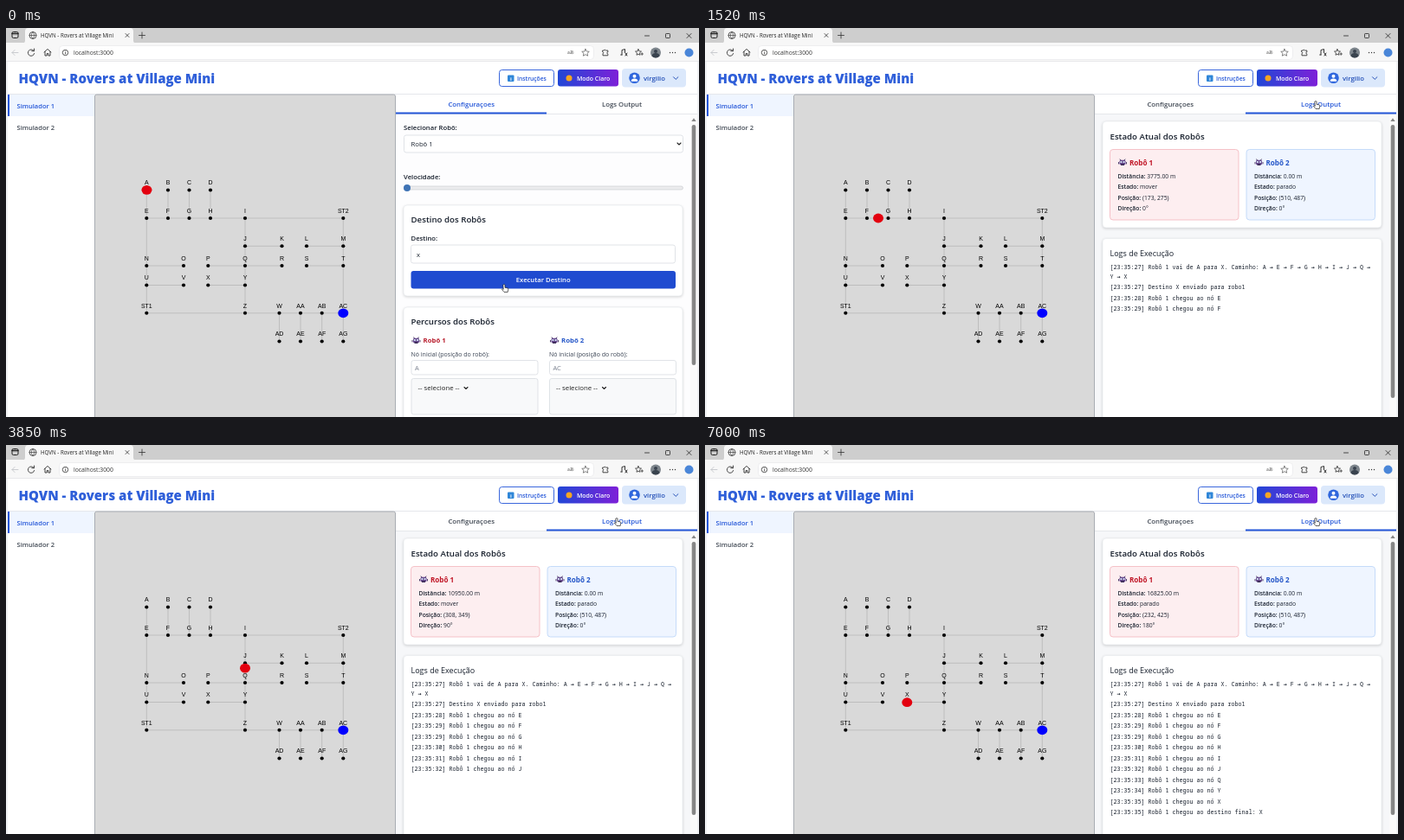
Recreate the animation shown at these times as an HTML page. Size 800 by 450 pixels, loop 7030 ms.

```html
<!DOCTYPE html>
<html lang="pt">
<head>
<meta charset="utf-8">
<title>Simulador</title>
<style>
html, body { margin: 0; width: 100%; height: 100%; overflow: hidden; background: #fff; }
svg { display: block; width: 100vw; height: 100vh; font-family: "Open Sans", "Noto Sans", sans-serif; }
text { white-space: pre; }
.map { font-family: "Liberation Sans", Arial, sans-serif; }
.mono { font-family: "Noto Sans Mono", "DejaVu Sans Mono", monospace; }
.arrow { font-family: "DejaVu Sans Mono", monospace; font-weight: 700; }
.card { filter: drop-shadow(0 1px 1.5px rgba(0,0,0,.16)); }
</style>
</head>
<body>
<svg id="stage" viewBox="0 0 800 450"></svg>
<script>
const LOOP = 7030;
const BLUE = '#2456d8', INK = '#18202d', GREY = '#414954';

// Drawing helpers; text is placed by the middle of its capitals.
const text = (x, cy, s, size, weight = 400, fill = INK, extra = '') =>
  `<text x="${x}" y="${(cy + size * .38).toFixed(2)}" font-size="${size}" font-weight="${weight}" fill="${fill}" ${extra}>${s}</text>`;
const rect = (x, y, w, h, fill, r = 0, stroke = 'none', extra = '') =>
  `<rect x="${x}" y="${y}" width="${w}" height="${h}" rx="${r}" fill="${fill}" stroke="${stroke}" ${extra}/>`;
const dot = (x, y, r, fill, stroke = 'none') =>
  `<circle cx="${x}" cy="${y}" r="${r}" fill="${fill}" stroke="${stroke}" stroke-width=".9"/>`;
const line = (d, stroke = '#333', w = .9, fill = 'none') =>
  `<path d="${d}" stroke="${stroke}" stroke-width="${w}" fill="${fill}" stroke-linecap="round" stroke-linejoin="round"/>`;
const mid = 'text-anchor="middle"';
const card = (y, h) => rect(459, y, 322, h, '#fff', 4, '#e5e7eb', 'stroke-width=".6" class="card"');

function browser() {
  return rect(0, 0, 800, 18, '#cecece') + rect(0, 17, 800, 22, '#f7f7f7') +
    `<path d="M19 17.5q3 0 3-3V4q0-4 4-4H143q4 0 4 4v10.5q0 3 3 3z" fill="#f7f7f7"/>` +
    rect(7, 4.5, 7, 7, 'none', 1.5, '#222', 'stroke-width="1"') + line('M7 6.5H14', '#222', 1.3) +
    dot(31, 8.5, 4, 'none', '#444') + line('M27 8.5H35M31 4.5Q27.5 8.5 31 12.5Q34.5 8.5 31 4.5', '#444', .7) +
    text(40, 8.5, 'HQVN - Rovers at Village Mini', 6.2, 400, '#222') +
    line('M138 6.5l4 4m0-4l-4 4M157 5v7M153.5 8.5h7', '#333', .8) +
    line('M737.5 9h5M786 6.5l5 5m0-5l-5 5', '#222', .8) + rect(761.5, 6.5, 5, 5, 'none', .8, '#222', 'stroke-width=".8"') +
    line('M14 28.5H7m3-3l-3 3l3 3', '#c5c7cb', .9) +
    line('M32 26.3A3.7 3.7 0 1 0 32.7 29.5M32.5 24v2.7h-2.7', '#333', .9) +
    line('M44 28l4-3.6l4 3.6M45 27.5V32h2.2v-2.5h1.7V32H51v-4.5', '#333', .9) +
    rect(61.5, 20.5, 617, 16, '#fff', 4, '#e4e5e8', 'stroke-width=".6"') +
    dot(68.5, 28.5, 3.2, 'none', '#444') + line('M68.5 28.3v1.7M68.5 26.8v.1', '#444', .8) +
    text(78, 28.3, 'localhost:3000', 6.8, 400, '#333') +
    text(648, 28.5, 'aあ', 5, 400, '#444') +
    line('M669 24.3l1.25 2.7l3 .3l-2.2 2l.6 2.9l-2.65-1.5l-2.65 1.5l.6-2.9l-2.2-2l3-.3z', '#555', .7) +
    line('M689 26h1.5q.5-2 2 0h2.3v2q-2.5.4 0 2.2v1.6H689v-2q2-1.2 0-2z', '#333', .9) +
    line('M711 31v-5.5l3.5-1v4M709.7 31h1.3M715 29l2 3m0-3l-2 3', '#333', 1) +
    line('M730 24.5l1 2.3l2.5.3l-2 1.7l.5 2.5l-2-1.2l-2 1.2l.4-2.5l-1.9-1.7l2.5-.3zM733 30h2.5M734.2 28.8v2.5', '#333', .8) +
    dot(750, 28.5, 6, '#7d858c') + `<path d="M745.5 32.5a4.5 3.5 0 0 1 9 0a6 6 0 0 1-9 0z" fill="#39434e"/>` + dot(750, 27, 2, '#39434e') +
    [766.5, 769.5, 772.5].map(x => dot(x, 28.5, .7, '#333')).join('') +
    dot(788.5, 28.5, 5, '#4a86d8') +
    rect(0, 38.5, 2, 412, '#f1f2f4') + rect(798, 38.5, 2, 412, '#f1f2f4') + rect(0, 38.3, 800, .7, '#e2e3e6');
}

function header() {
  return text(14.5, 58.5, 'HQVN - Rovers at Village Mini', 15, 800, '#2f5fd9') +
    rect(569.5, 48.5, 63, 19, '#fff', 3, BLUE, 'stroke-width=".9"') +
    rect(579, 54.5, 7.5, 7.5, '#2f86d8', 1) + text(582.8, 58.3, 'i', 6, 700, '#fff', mid) +
    text(590, 58, 'Instruções', 6.7, 600, BLUE) +
    rect(637, 48, 70, 19.5, 'url(#mode)', 3) + dot(650, 58, 3.5, '#f5a623') +
    text(659, 58, 'Modo Claro', 6.9, 600, '#fff') +
    rect(711, 47, 74, 21.5, '#dbe8fb', 4) + dot(725.5, 57.7, 6.3, '#2f66dd') +
    dot(725.5, 55.7, 2, '#fff') + `<path d="M721.7 61.7a3.8 3.2 0 0 1 7.6 0z" fill="#fff"/>` +
    text(736, 57.7, 'virgilio', 7.7, 600, '#2450b8') + line('M770.5 56.7l2.7 2.7l2.7-2.7', '#2450b8', 1) +
    rect(2, 76, 796, .8, '#dfe2e6') +
    rect(2, 77, 100, 25, '#eff5ff') + rect(2, 77, 2, 25, BLUE) +
    text(12.5, 89.7, 'Simulador 1', 7.55, 600, BLUE) + text(12.5, 114.7, 'Simulador 2', 7.55, 600, GREY);
}

// Map: names per row with their x.
const rows = [
  [187.5, 'A 162.3 B 187 C 211.5 D 236'],
  [220, 'E 162.3 F 187 G 211.5 H 236 I 276 ST2 389.3'],
  [252.3, 'J 276 K 318.5 L 347 M 389.3'],
  [275, 'N 162.3 O 205 P 233.3 Q 276 R 318.5 S 347 T 389.3'],
  [297.5, 'U 162.3 V 205 X 233.3 Y 276'],
  [329.8, 'ST1 162.3 Z 276 W 315.5 AA 340 AB 364.7 AC 389.3'],
  [362.5, 'AD 315.5 AE 340 AF 364.7 AG 389.3']
];
const edges = 'A-E B-F C-G D-H E-ST2 E-ST1 I-Z ST2-AG J-K L-M N-O P-R S-T U-V X-Y ST1-AC W-AD AA-AE AB-AF';

function map() {
  const at = {};
  for (const [y, list] of rows) {
    const w = list.split(' ');
    for (let i = 0; i < w.length; i += 2) at[w[i]] = [+w[i + 1], y];
  }
  let out = rect(102.5, 77, 347, 380, '#d9d9d9', 2, '#a9adb3', 'stroke-width="1"');
  for (const e of edges.split(' ')) {
    const [a, b] = e.split('-');
    out += line(`M${at[a]}L${at[b]}`, '#b2b2b2', .7);
  }
  for (const n in at) {
    const [x, y] = at[n];
    out += `<ellipse cx="${x}" cy="${y}" rx="2.1" ry="2" fill="#000"/>` + text(x, y - 8.7, n, 7, 400, '#000', mid + ' class="map"');
  }
  return out + '<ellipse cx="389.3" cy="329.8" rx="6" ry="5.4" fill="#00f"/>' +
    '<ellipse id="bot" rx="6" ry="5.4" fill="#e3000f"/>';
}

const face = (x, y) => rect(x - 3.5, y - 2.8, 7, 5.6, '#6b4c93', 1.5) +
  line(`M${x - 3} ${y - 3.5}l1.2 1M${x + 3} ${y - 3.5}l-1.2 1M${x - 4.5} ${y}v1.5M${x + 4.5} ${y}v1.5`, '#4a3a66', 1) +
  dot(x - 1.6, y - .5, 1.1, '#d9eef8') + dot(x + 1.6, y - .5, 1.1, '#d9eef8') + rect(x - 2, y + 1.5, 4, 2, '#41305c', .5);

function config() {
  const field = (x, y, w, h, fill = '#fff') => rect(x, y, w, h, fill, 2.5, '#d9dce1', 'stroke-width=".8"');
  const route = (x, n, start, color) =>
    face(x + 6, 361.5) + text(x + 14, 361.3, 'Robô ' + n, 7.8, 700, color) +
    text(x, 377, 'Nó inicial (posição do robô):', 7, 400, '#374151') +
    field(x + .5, 384.5, 146, 16.5) + text(x + 4.5, 393, start, 7.5, 400, '#7b8290') +
    field(x + .5, 405.5, 146, 41.5, '#f8f9fa') + text(x + 8, 416.5, '-- selecione --', 7.8, 400, '#222') +
    line(`M${x + 61.5} 415.5l2 2l2-2`, '#222', 1.1);
  return rect(450, 100, 340, 350, '#fdfdfe') +
    text(459, 115, 'Selecionar Robô:', 7.7, 600) +
    field(459.5, 124, 322, 20) + text(467.5, 134.2, 'Robô 1', 7.7) + line('M775 133l2 2l2-2', '#222', 1.1) +
    text(459, 171.7, 'Velocidade:', 7.7, 600) +
    rect(459.5, 183, 322, 4, '#ececee', 2, '#c3c6ca', 'stroke-width=".6"') + dot(463, 185, 4, '#3f74b5') +
    card(205, 105) + text(467.5, 221.5, 'Destino dos Robôs', 9.7, 600) +
    text(467.5, 243, 'Destino:', 7.7, 600) + field(467.5, 251, 305, 21) + text(474, 262, 'x', 7.7) +
    rect(467.5, 281, 305.5, 20.5, '#1f4bd0', 3, 'none', 'id="go"') + text(620.2, 291.5, 'Executar Destino', 7.7, 600, '#fff', mid) +
    card(323, 140) + text(467.5, 339.5, 'Percursos dos Robôs', 9.7, 600) +
    route(467.5, 1, 'A', '#b81c2c') + route(627, 2, 'AC', '#2456c8');
}

function logs() {
  const state = (x, n, fill, edge, color, vals) =>
    rect(x, 140.5, 148.5, 81.5, fill, 3.5, edge, 'stroke-width=".8"') +
    face(x + 14.5, 155.5) + text(x + 22.5, 155.5, 'Robô ' + n, 8.1, 700, color) +
    ['Distância', 'Estado', 'Posição', 'Direção'].map((k, i) =>
      text(x + 9, 171.2 + i * 12.5, `<tspan font-weight="600">${k}:</tspan> <tspan id="v${n}${i}">${vals[i]}</tspan>`, 6.75)).join('');
  const entry = ([, s], i) =>
    text(467.5, 276.3 + (i && i * 12.5 - 1.5), s.replace(/→/g, '<tspan class="arrow">→</tspan>'), 6.68, 400, INK, `class="mono" id="log${i}"`);
  return rect(450, 100, 340, 350, '#f6f7f9') +
    card(108, 123) + text(467.5, 125.5, 'Estado Atual dos Robôs', 9.7, 600) +
    state(467.5, 1, '#fdeef0', '#f3b4bb', '#c01627', ['', '', '', '']) +
    state(625, 2, '#eff5ff', '#b9d3f8', '#2456c8', ['0.00 m', 'parado', '(510, 487)', '0°']) +
    card(243.5, 220) + text(467.5, 260.2, 'Logs de Execução', 9, 500) +
    entries.map(entry).join('');
}

// Log: time of appearance and line.
const entries = [
  [60, '[23:35:27] Robô 1 vai de A para X. Caminho: A → E → F → G → H → I → J → Q →'],
  [60, 'Y → X'],
  [60, '[23:35:27] Destino X enviado para robo1'],
  ...[[770, 28, 'E'], [1265, 29, 'F'], [1745, 29, 'G'], [2250, 30, 'H'], [3025, 31, 'I'],
    [3715, 32, 'J'], [4210, 33, 'Q'], [4710, 34, 'Y'], [5490, 35, 'X']]
    .map(([t, s, n]) => [t, `[23:35:${s}] Robô 1 chegou ao nó ${n}`]),
  [5550, '[23:35:35] Robô 1 chegou ao destino final: X']
];

// Time, then simulator x and y.
const route = [[60, 106, 212], [770, 106, 275], [910, 117, 275], [2060, 222, 275], [3025, 308, 275],
  [4640, 308, 419], [4705, 308, 425], [5120, 267, 425], [5490, 232, 425]];
const metres = [[60, 0], [910, 2175], [2060, 5175], [3030, 9100], [4640, 12725], [5550, 16825]];
const mouse = [[180, 0, 0], [320, 24, -35], [560, 105, -175], [740, 130, -212]];

function along(keys, t) {
  if (t <= keys[0][0]) return keys[0].slice(1);
  for (let i = 1; i < keys.length; i++) {
    const a = keys[i - 1], b = keys[i];
    if (t < b[0]) {
      const k = (t - a[0]) / (b[0] - a[0]);
      return a.slice(1).map((v, j) => v + (b[j + 1] - v) * k);
    }
  }
  return keys[keys.length - 1].slice(1);
}

const $ = id => document.getElementById(id);
$('stage').innerHTML =
  '<defs><linearGradient id="mode"><stop offset="0" stop-color="#2147d6"/><stop offset="1" stop-color="#7d20d8"/></linearGradient></defs>' +
  rect(0, 0, 800, 450, '#fff') + browser() + header() + map() +
  `<g id="config">${config()}</g><g id="logs">${logs()}</g>` +
  rect(450, 77, 348, 23, '#fff') + rect(450, 99, 348, .8, '#dfe2e6') + rect(450, 97.5, 174, 2, BLUE, 0, 'none', 'id="under"') +
  text(537.2, 87.8, 'Configuraçoes', 7.8, 600, BLUE, mid + ' id="tab0"') +
  text(711, 87.8, 'Logs Output', 7.8, 600, GREY, mid + ' id="tab1"') +
  rect(790, 100, 8, 350, '#fafafa') + '<path d="M791.3 108l2.7-3.7l2.7 3.7z" fill="#868686"/>' +
  rect(791.7, 112, 4.6, 278, '#868686', 2.3, 'none', 'id="thumb"') +
  '<g id="mouse">' +
  `<g id="hand">${line('M574 297q1.2-1 2 0v3.3l3 .6q1 .2.8 1.3l-.6 3.3h-4.2l-2.5-3q-.2-1.3 1.5-.4z', '#222', .7, '#fff')}</g>` +
  `<g id="arrow">${line('M574 296v8.5l2-1.8l1.3 3l1.4-.6l-1.3-2.9h2.6z', '#222', .7, '#fff')}</g></g>`;

const show = (id, on) => $(id).setAttribute('visibility', on ? 'inherit' : 'hidden');

function draw(t) {
  const [x, y] = along(route, t);
  $('bot').setAttribute('cx', 276 + (x - 308) * .562);
  $('bot').setAttribute('cy', 220 + (y - 275) * .518);

  const [m] = along(metres, t);
  $('v10').textContent = (Math.round(m / 25) * 25).toFixed(2) + ' m';
  $('v11').textContent = t < 5490 ? 'mover' : 'parado';
  $('v12').textContent = `(${Math.round(x)}, ${Math.round(y)})`;
  $('v13').textContent = (t < 770 ? 90 : t < 3040 ? 0 : t < 4715 ? 90 : 180) + '°';
  entries.forEach(([at], i) => show('log' + i, t >= at));

  const open = t >= 800;
  $('config').style.display = open ? 'none' : '';
  $('logs').style.display = open ? '' : 'none';
  $('under').setAttribute('x', open ? 624 : 450);
  $('tab0').setAttribute('fill', open ? GREY : BLUE);
  $('tab1').setAttribute('fill', open ? BLUE : GREY);
  $('thumb').setAttribute('height', open ? 316 : 278);

  const [dx, dy] = along(mouse, t);
  $('mouse').setAttribute('transform', `translate(${dx} ${dy})`);
  const onButton = dy > -15, hand = onButton || dy < -200;
  $('go').setAttribute('fill', onButton ? '#1f4bd0' : '#2a62e6');
  show('hand', hand);
  show('arrow', !hand);
}

const start = performance.now();
function tick() {
  draw((performance.now() - start) % LOOP);
  requestAnimationFrame(tick);
}
tick();
</script>
</body>
</html>
```
